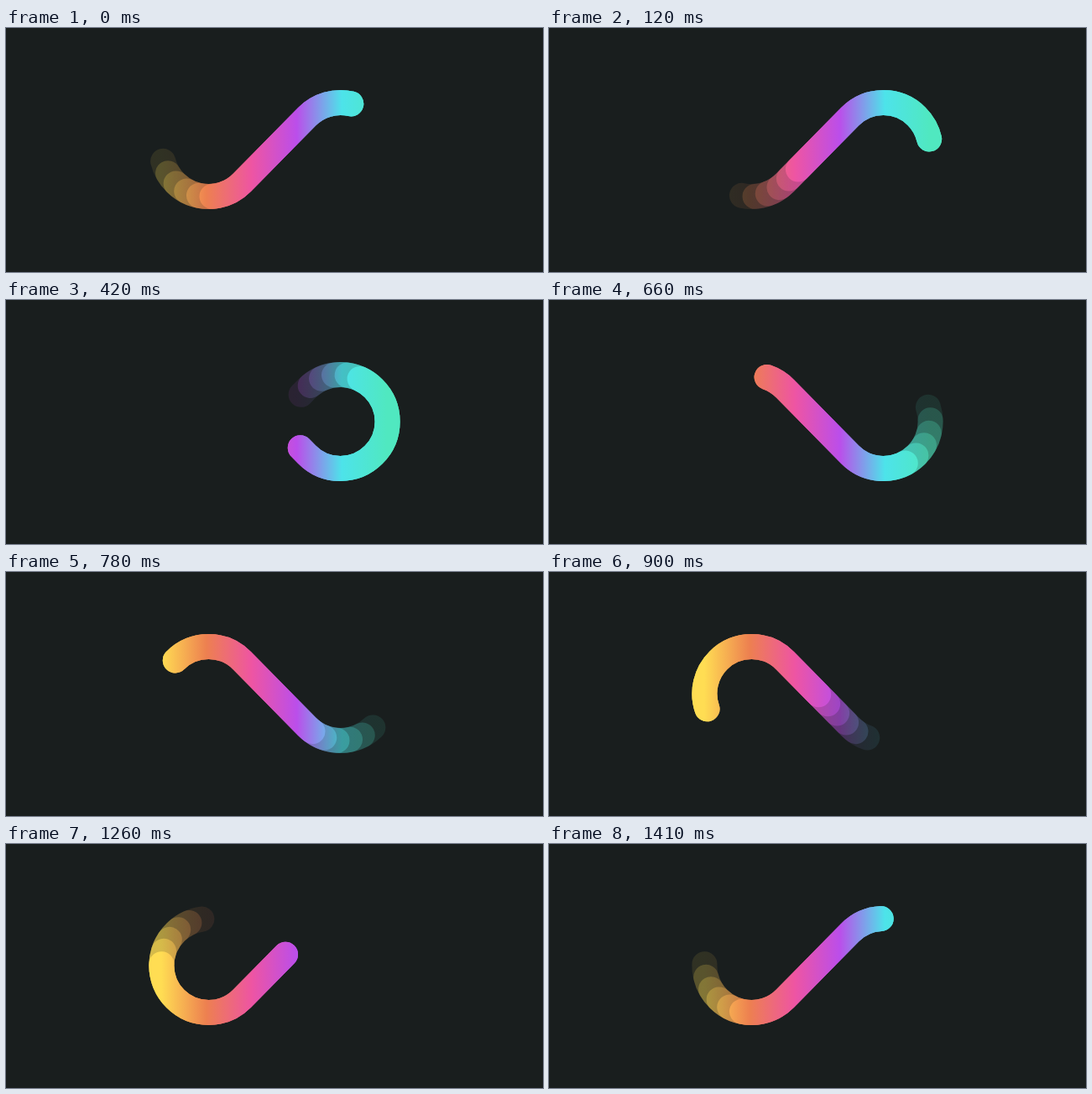
Write an HTML page that moves like this. It is 640 by 291 pixels and loops after 1440 ms.

```html
<!DOCTYPE html>
<html lang="en">
<head>
<meta charset="utf-8">
<title>Infinity loader</title>
<style>
  html, body { margin: 0; width: 100%; height: 100%; overflow: hidden; background: #191e1e; }
  svg { display: block; width: 100%; height: 100%; }
  path { fill: none; stroke: url(#rainbow); stroke-width: 30; stroke-linecap: round; }
</style>
</head>
<body>
<svg viewBox="0 0 640 291">
  <defs>
    <linearGradient id="rainbow" gradientUnits="userSpaceOnUse" x1="185" x2="454" y1="0" y2="0">
      <stop offset="0" stop-color="#ffdd53"/>
      <stop offset=".2" stop-color="#ed8050"/>
      <stop offset=".4" stop-color="#ee55a2"/>
      <stop offset=".6" stop-color="#bb4eea"/>
      <stop offset=".8" stop-color="#4de3ea"/>
      <stop offset="1" stop-color="#50e8c0"/>
    </linearGradient>
  </defs>
  <g id="trail"></g>
</svg>
<script>
  const LOOP = 1440, TICK = 30;
  const STEPS = LOOP / TICK;        // path length, in ticks
  const HEAD = 7.19, LENGTH = 18.3; // head position at time 0 and trail length
  const FADE = 6;
  const TRACK = 'M320 145 L358.6 105.8 A56 56 0 1 1 358.6 184.2 ' +
                'L281.4 105.8 A56 56 0 1 0 281.4 184.2 Z';

  const coverage = k => k < 0 ? 0 : 0.1 + 0.18 * k;
  const trail = document.getElementById('trail');

  // Nested strokes share one head; together they build up the stepped tail.
  const layers = Array.from({ length: FADE }, (_, k) => {
    const path = document.createElementNS('http://www.w3.org/2000/svg', 'path');
    const length = LENGTH - k;
    const alpha = 1 - (1 - coverage(k)) / (1 - coverage(k - 1));
    path.setAttribute('d', TRACK);
    path.setAttribute('pathLength', STEPS);
    path.setAttribute('stroke-dasharray', `${length} ${STEPS - length}`);
    path.setAttribute('stroke-opacity', alpha);
    trail.append(path);
    return { path, length };
  });

  // The pose holds for two ticks, except for the last two single ticks.
  function pose(ms) {
    const tick = Math.floor((ms % LOOP) / TICK);
    return tick === STEPS - 1 ? tick : tick - tick % 2;
  }

  function draw(ms) {
    const head = HEAD + pose(ms);
    for (const { path, length } of layers) {
      const start = (head - length + STEPS) % STEPS;
      path.setAttribute('stroke-dashoffset', STEPS - start);
    }
  }

  let origin;
  function frame(now) {
    origin ??= now;
    draw(Math.max(0, now - origin));
    requestAnimationFrame(frame);
  }
  draw(0);
  requestAnimationFrame(frame);
</script>
</body>
</html>
```
